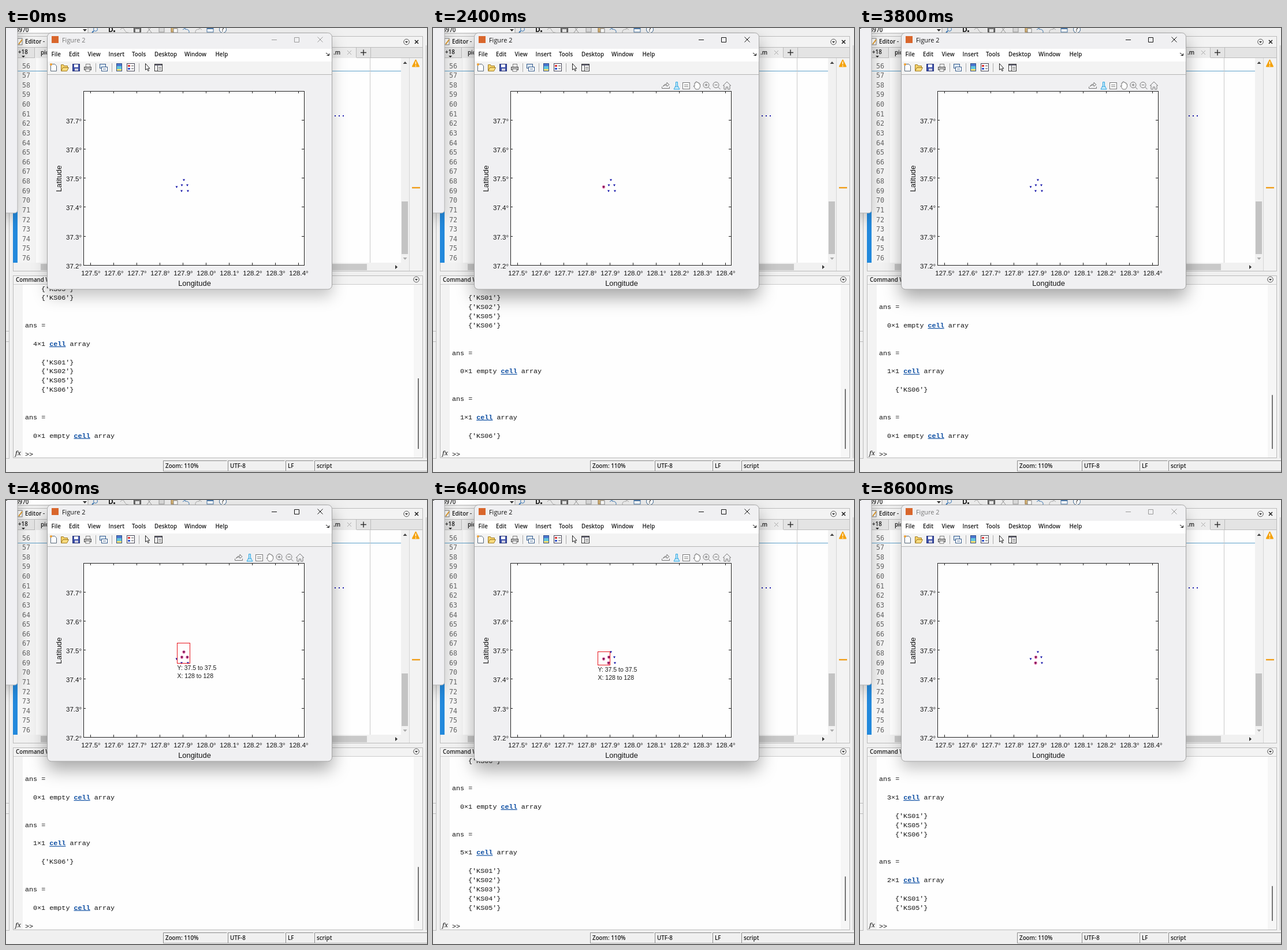
An HTML page that plays this animation: 729 px wide and 768 px high, repeating every 8.8 s.

```html
<!DOCTYPE html>
<html lang="en">
<head>
<meta charset="utf-8">
<title>Brushing points in a figure</title>
<style>
  html, body { margin: 0; width: 100%; height: 100%; overflow: hidden; background: #f0f0f0; }
  svg { display: block; }
  text { font: 600 9.8px "Open Sans", "Noto Sans", sans-serif; fill: #1a1a1a; }
  .num { font: 11.7px "DejaVu Sans Mono", monospace; fill: #666; }
  .mono { font: 11.75px "Liberation Mono", "Courier New", monospace; fill: #111; }
  .link { font-weight: bold; fill: #0b4da2; text-decoration: underline; }
  .tick { font: 11.5px "Liberation Sans", Arial, sans-serif; fill: #111; }
  .axis { font: 12.9px "Liberation Sans", Arial, sans-serif; fill: #111; }
  .tip { font: 10.5px "Liberation Sans", Arial, sans-serif; }
  .mid { text-anchor: middle; }
  .end { text-anchor: end; }
  #frame { filter: drop-shadow(0 12px 13px rgba(0,0,0,.22)); }
  .active #frame { filter: drop-shadow(0 14px 15px rgba(0,0,0,.34)); }
  #caption text { font-weight: 400; font-size: 10.9px; fill: #777; }
  #caption path { stroke: #999; }
  .active #caption text { fill: #111; }
  .active #caption path { stroke: #111; }
</style>
</head>
<body>
<svg id="stage" width="729" height="768" viewBox="0 0 729 768"></svg>
<script>
const R = (x, y, w, h, fill, more = '') =>
  `<rect x="${x}" y="${y}" width="${w}" height="${h}" fill="${fill}" ${more}/>`;
const P = (d, stroke, fill = 'none', more = '') =>
  `<path d="${d}" stroke="${stroke}" fill="${fill}" ${more}/>`;
const C = (x, y, r, stroke, fill = 'none') =>
  `<circle cx="${x}" cy="${y}" r="${r}" stroke="${stroke}" fill="${fill}"/>`;
const T = (x, y, s, cls = '', more = '') => `<text x="${x}" y="${y}" class="${cls}" ${more}>${s}</text>`;
const range = (n, f) => Array.from({ length: n }, (_, i) => f(i)).join('');
const dropButton = (x, y) => C(x, y, 4.8, '#555') + P(`M${x - 2.5} ${y - 1}h5l-2.5 3z`, 'none', '#333');

function desktop() {
  return R(0, 0, 729, 768, '#f0f0f0')
    // clipped main toolbar
    + R(12, -5, 130, 14, '#fff', 'stroke="#aaa"') + T(17, 7, '3970')
    + P('M133 2h7l-3.5 4z', 'none', '#333')
    + C(155, 2, 3.5, '#3a78b8') + P('M152 5l-3 3', '#3a78b8', 'none', 'stroke-width="2"')
    + T(177, 7, 'D', '', 'style="font-weight:700;font-size:12px"') + R(186, 4, 3, 3, '#333')
    + P('M198 3q4-6 7 0t7 5', '#aaa')
    + R(221.5, -3, 12, 10, '#777', 'stroke="#444"') + R(224, 2, 7, 5, '#eee')
    + P('M244 8l6-8M252 8l-6-8', '#999')
    + R(265, -2, 9, 9, '#ddd', 'stroke="#999"')
    + R(286, -2, 9, 9, '#d9b777', 'stroke="#997540"') + R(290, 1, 7, 7, '#fff', 'stroke="#888"')
    + P('M306 3l4-3v2q8 0 7 6', '#3d79b5') + P('M339 3l-4-3v2q-8 0-7 6', '#aaa')
    + R(348, -2, 11, 9, '#fff', 'stroke="#4b78a8"') + R(348, -2, 11, 4, '#4b78a8')
    + C(375.5, 2.5, 6, '#33608d', '#fff') + T(373, 6, '?')
    // editor
    + R(12.5, 14.5, 709, 406, '#f3f3f3', 'stroke="#bbb"')
    + R(20, 18, 8, 11, '#fff', 'stroke="#777"') + P('M22 28l6-8', '#e09a2b', 'none', 'stroke-width="2"')
    + T(33, 27, 'Editor - ') + dropButton(693.5, 24)
    + P('M708 21l6 6M714 21l-6 6', '#222', 'none', 'stroke-width="1.6"')
    + R(13, 33, 708, 19, '#e4e4e4') + P('M13 33.5h708M13 51.5h708', '#bcbcbc')
    + T(21, 45, '+18') + P('M27 48h6l-3 3z', 'none', '#222')
    + R(50, 34, 557, 18, '#ececec') + P('M49.5 34v17M606.5 34v17M631.5 34v17', '#bbb')
    + T(60, 46, 'pic') + T(567, 46, '.m')
    + P('M591 39l7 7M598 39l-7 7', '#aaa') + P('M614 42.5h10M619 37.5v10', '#333', 'none', 'stroke-width="1.5"')
    + R(20, 52, 32, 354, '#f4f4f4') + R(52, 52, 632, 354, '#fefefe')
    + R(12, 52, 8, 354, '#2389dc')
    + range(21, i => T(28, 69.5 + i * 16.63, 56 + i, 'num'))
    + P('M20 74.5h664', '#5c9fc9') + P('M630.5 52v354', '#c9c9c9')
    + range(3, i => R(569 + i * 7, 151, 2, 2, '#1a1ab0'))
    + R(684, 52, 14, 354, '#f1f1f1') + P('M687.5 62h7l-3.5-4z', 'none', '#444')
    + R(685, 300, 11, 91, '#c3c3c3') + P('M687.5 397h7l-3.5 4z', 'none', '#aaa')
    + P('M698.5 52v368', '#d5d5d5')
    + P('M709.5 55.5l5.5 11h-11z', '#f5a20a', '#f5a20a', 'stroke-width="2" stroke-linejoin="round"')
    + P('M709.5 58v5M709.5 64.5v2', '#fff', 'none', 'stroke-width="1.4"')
    + R(703, 275, 14, 2.5, '#f0a020')
    + R(13, 406, 685, 14, '#f1f1f1') + R(60, 408, 565, 11, '#c9c9c9') + P('M674 410v7l4-3.5z', 'none', '#333')
    // command window
    + R(12.5, 428.5, 709, 315, '#f3f3f3', 'stroke="#bbb"')
    + P('M13 443.5h708', '#ccc') + T(17, 439, 'Command Window') + dropButton(710.5, 435)
    + R(29, 444, 677, 299, '#fefefe') + R(706, 444, 15, 299, '#f6f6f6')
    + T(16, 739, 'fx', '', 'style="font:italic 500 11.5px \'Noto Serif\',serif"') + T(33, 741, '&gt;&gt;', 'mono')
    // outer borders and status bar
    + P('M727.5 30v714', '#bbb') + P('M5.5 320v424M0 524.5h5M0 542.5h5M0 744.5h6', '#bbb')
    + range(4, i => {
        const x = [272, 384, 484, 534][i];
        return P(`M${x + .5} 766v-17.5h${[110, 98, 48, 195][i]}`, '#8c8c8c')
          + T(x + 4, 761, ['Zoom: 110%', 'UTF-8', 'LF', 'script'][i]);
      })
    + P('M272 766.5h457', '#aaa')
    + '<clipPath id="view"><path d="M29 444h677v299H29z"/></clipPath><g id="log" clip-path="url(#view)"></g>'
    + '<path id="thumb" stroke="#555" stroke-width="1.6"/>'
    // neighbouring window
    + R(-20, -20, 40, 340, '#f0f0f3', 'rx="5" stroke="#b0b0b0" style="filter:drop-shadow(0 8px 12px rgba(0,0,0,.2))"')
    + R(0, 0, 2, 1, '#333', 'id="speck"');
}

function menuAndTools() {
  const menu = { File: 78.5, Edit: 109, View: 141.5, Insert: 177.5, Tools: 218, Desktop: 257, Window: 309, Help: 362.5 };
  return R(72, 36, 492, 22, '#fff')
    + Object.entries(menu).map(([s, x]) => T(x, 49, s)).join('')
    + P('M554 43l5 4M559.5 44v3.5h-4', '#111')
    + R(72, 58, 492, 22, '#f3f3f3') + P('M72 80.5h492', '#b4b4b4')
    + P('M155.5 61v15M183.5 61v15M230.5 61v15', '#aaa')
    + P('M77.5 62.5h7l3 3v9h-10z', '#567', '#fff') + C(78, 63, 2, 'none', '#f0a030')
    + P('M95.5 73.5v-10h4l1 2h6v3', '#a07a20', '#f5d26a') + P('M95.5 74.5l3-6h10l-3 6z', '#a07a20', '#f9dc80')
    + R(115.5, 62.5, 12, 12, '#3b4ea8', 'stroke="#26347a"') + R(118, 63, 7, 5, '#fff') + R(119, 70, 6, 4, '#ccd')
    + R(138.5, 62.5, 7, 5, '#fff', 'stroke="#777"') + R(135.5, 67.5, 12, 5, '#bbb', 'stroke="#555"')
    + R(138, 71, 7, 4, '#fff', 'stroke="#777"')
    + R(162.5, 62.5, 10, 7, '#dbe8f6', 'stroke="#345a8a"') + R(165.5, 67.5, 10, 7, '#fff', 'stroke="#345a8a"')
    + P('M168 71h5', '#345a8a')
    + R(191.5, 61.5, 9, 13, '#62c6dd', 'stroke="#334f88"') + R(192, 62, 8, 4, '#4977d0') + R(192, 71, 8, 3, '#f2df72')
    + R(209.5, 61.5, 13, 13, '#fff', 'stroke="#445"') + R(211, 64, 4, 3, '#d33') + R(211, 69, 4, 3, '#35c')
    + P('M217 65.5h4M217 70.5h4', '#555')
    + P('M241.5 61.5v11l2.5-2 2 4 1.7-.8-2-3.7h3.3z', '#222', '#fff')
    + R(257.5, 62.5, 13, 12, '#fff', 'stroke="#333"') + R(258, 63, 12, 2, '#667')
    + P('M262.5 65v9M264 68h5M264 71h5', '#444');
}

function axes() {
  return R(134.5, 109.5, 382, 301, '#fefefe', 'stroke="#222"')
    + range(6, i => {
        const y = 410.5 - Math.round(i * 50.25);
        return P(`M134 ${y}h4M516 ${y}h-4`, '#222') + T(131, y + 5, `37.${i + 2}°`, 'tick end');
      })
    + range(10, i => {
        const x = 146.5 + Math.round(i * 39.95);
        return P(`M${x} 410v-4M${x} 109v4`, '#222') + T(x + .5, 428, (127.5 + i / 10).toFixed(1) + '°', 'tick mid');
      })
    + T(326.5, 445.5, 'Longitude', 'axis mid')
    + T(0, 0, 'Latitude', 'axis mid', 'transform="translate(96 260.5) rotate(-90)"');
}

function axesTools() {
  const lens = x => C(x, 98.5, 5, '#777') + P(`M${x + 3.5} 102l4 4M${x - 2.5} 98.5h5`, '#777');
  return '<g id="tools">'
    + P('M396.5 101.5v3h13v-3M398 101q3-5 7-4v-3l4 4-4 3v-2q-4-1-7 2z', '#777')
    + P('M420.5 93.5h3v6l3.5 6.5h-10l3.5-6.5zM419 101h6', '#2aa5e2', '#c4e8f8')
    + R(432.5, 94.5, 12, 11, '#fff', 'stroke="#777"') + P('M435 98.5h7M435 101.5h7', '#777')
    + P('M451 100l2 1v-6h2v-2h2v1h2v1h2v2h1.5v5l-2.5 4h-5z', '#777', '#fff')
    + lens(473) + P('M473 96v5', '#777') + lens(490)
    + P('M502 100l7-7 7 7M504 99v7h3.5v-4h3v4h3.5v-7', '#777') + '</g>';
}

function figure() {
  return '<g id="figure">' + R(71.5, 8.5, 493, 443.5, '#f0f0f2', 'id="frame" rx="7" stroke="#a4a4a4"')
    + R(79, 14, 12, 12, '#d9662c')
    + '<g id="caption">' + T(97, 24.5, 'Figure 2')
    + P('M460 20.5h9M499.5 16.5h8v8h-8zM539.5 15.5l9 9M548.5 15.5l-9 9', '#999') + '</g>'
    + menuAndTools() + axes() + axesTools() + '<g id="marks"></g></g>';
}

const stations = [[304.5, 272], [308, 263], [314, 272], [315, 282], [304, 282], [295.5, 275]];
// press and release times, start corner, growth per step
const STEP = 200;
const drags = [
  { from: 1800, to: 2400, x: 286, y: 264, dx: 7, dy: 10 },
  { from: 3000, to: 3200, x: 350, y: 330, dx: 0, dy: 0 },
  { from: 4200, to: 5200, x: 296, y: 247, dx: 7.33, dy: 11.67 },
  { from: 6000, to: 6600, x: 285, y: 262, dx: 10.25, dy: 11.5 },
  { from: 7000, to: 7600, x: 297, y: 260, dx: 4.75, dy: 14.5 },
];

function boxAt(d, t) {
  const n = (Math.min(t, d.to - STEP) - d.from) / STEP;
  return { x: d.x, y: d.y, w: Math.round(n * d.dx), h: Math.round(n * d.dy) };
}
const inside = b => stations.map((_, i) => i).filter(i => {
  const [x, y] = stations[i];
  return x > b.x && x < b.x + b.w && y > b.y && y < b.y + b.h;
});

const item = i => [61, `{'KS0${i + 1}'}`];
const block = ids => [
  [33, 'ans ='], 0,
  [47, `${ids.length}×1 ${ids.length ? '' : 'empty '}<tspan class="link">cell</tspan> array`], 0,
  ...ids.map(item), ...(ids.length ? [0, 0] : [0]),
];
const history = [item(4), item(5), 0, 0, ...block([0, 1, 4, 5]), ...block([])];

const $ = id => document.getElementById(id);
$('stage').innerHTML = desktop() + figure();

function drawLog(t) {
  const lines = [...history];
  for (const d of drags) if (t >= d.to) lines.push(...block(inside(boxAt(d, d.to))));
  const added = lines.length - history.length;
  while (!lines[lines.length - 1]) lines.pop();
  $('log').innerHTML = lines.map((l, i) => {
    const y = 708.5 - (lines.length - 1 - i) * 15.87;
    return l && y > 440 ? T(l[0], y, l[1], 'mono') : '';
  }).join('');
  $('thumb').setAttribute('d', `M714 728v${-122 * 39 / (39 + added)}`);
}

function drawMarks(t) {
  const d = drags.filter(d => t >= d.from).pop();
  const box = d && boxAt(d, t);
  const hit = d ? inside(box) : [];
  let s = stations.map(([x, y], i) =>
    (hit.includes(i) ? C(x, y, 2.4, '#f08abb', '#e0508f') : '')
    + P(`M${x - 2} ${y - 1.5}h4l-2 3.5z`, 'none', hit.includes(i) ? '#5c0c4c' : '#1010a8')).join('');
  if (d && t < d.to && box.w) {
    s += R(box.x + .5, box.y + .5, box.w, box.h, 'none', 'stroke="#e8141c"')
      + T(box.x + .5, box.y + box.h + 12, 'Y: 37.5 to 37.5', 'tip')
      + T(box.x + .5, box.y + box.h + 26, 'X: 128 to 128', 'tip');
  }
  $('marks').innerHTML = s;
}

let last = -1;
function tick(now) {
  const t = Math.floor(now % 8800 / STEP) * STEP;
  if (t !== last) {
    last = t;
    $('figure').classList.toggle('active', t >= 1600 && t < 8600);
    $('tools').style.display = t >= 1000 && t < 8000 ? '' : 'none';
    $('speck').style.display = t >= 2600 ? '' : 'none';
    drawLog(t);
    drawMarks(t);
  }
  requestAnimationFrame(tick);
}
tick(0);
</script>
</body>
</html>
```
